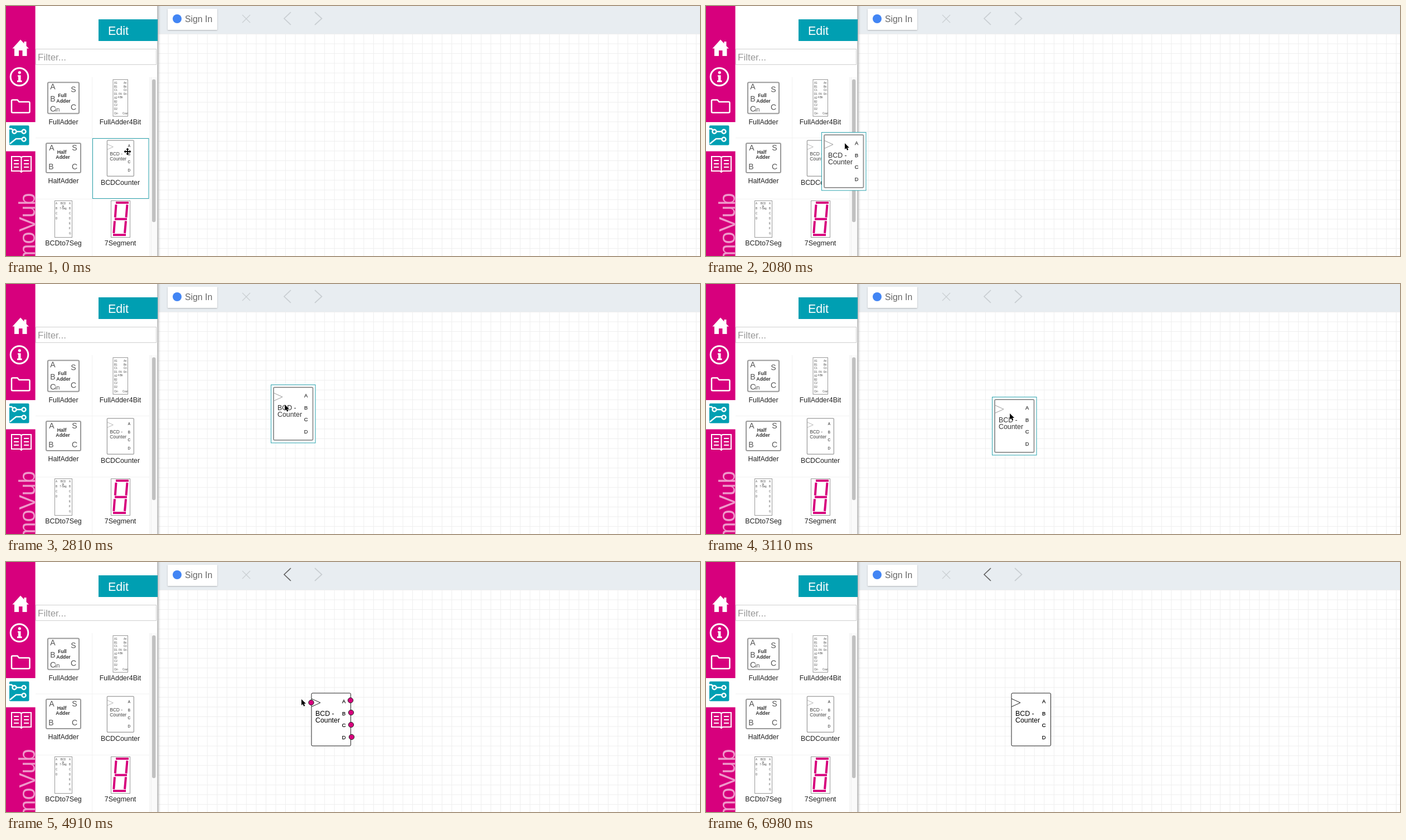
An HTML page for the animation above (7.47 s loop, 1245 px wide and 450 px high).

```html
<!DOCTYPE html>
<html lang="en">
<head>
<meta charset="utf-8">
<title>Circuit editor</title>
<style>
  html, body { margin: 0; width: 100%; height: 100%; overflow: hidden; background: #fff; }
  svg { display: block; width: 1245px; height: 450px; font-family: "Liberation Sans", Arial, sans-serif; }
  .icon { fill: none; stroke: #fff; stroke-width: 2.5; }
  .fine { stroke-width: 2; }
  .chip { fill: #fff; stroke: #999; stroke-width: 2; }
  .thin { stroke-width: 1; }
  .mid { text-anchor: middle; }
  .label { font-size: 12.4px; fill: #222; text-anchor: middle; }
  .pin { font-size: 14px; fill: #555; text-anchor: middle; }
  .name { font-size: 8.8px; font-weight: bold; fill: #333; text-anchor: middle; }
  .tiny { font-size: 4.6px; fill: #444; }
  .nav { fill: none; stroke: #c9ced2; stroke-width: 1.7; }
  .seg { stroke: #d7007d; stroke-width: 4; }
</style>
</head>
<body>
<svg viewBox="0 0 1245 450">
  <defs>
    <pattern id="grid" x="273" y="50" width="17.54" height="17.54" patternUnits="userSpaceOnUse">
      <path d="M.5 0V17.54M0 .5H17.54" stroke="#eee" fill="none"/>
    </pattern>
    <linearGradient id="edge">
      <stop stop-color="#777" stop-opacity=".75"/>
      <stop offset=".35" stop-color="#999" stop-opacity=".3"/>
      <stop offset="1" stop-color="#999" stop-opacity="0"/>
    </linearGradient>
    <filter id="shadow" x="-10%" y="-20%" width="120%" height="150%">
      <feDropShadow dx="0" dy="1" stdDeviation="1" flood-opacity=".25"/>
    </filter>
    <g id="counter">
      <rect x="5" y="5" width="70.5" height="95" rx="2" fill="#fff" stroke="currentColor"/>
      <path d="M5 15L21 22.3 5 29.6" fill="none" stroke="currentColor" stroke-width="1"/>
      <g stroke="none" fill="var(--ink)">
        <text font-size="12.4" x="12" y="45.5">BCD -</text>
        <text font-size="12.4" x="12" y="58">Counter</text>
        <g class="mid" font-size="9.3" stroke="var(--ink)" stroke-width=".25">
          <text x="63" y="22.5">A</text><text x="63" y="45">B</text>
          <text x="63" y="66">C</text><text x="63" y="88">D</text>
        </g>
      </g>
    </g>
  </defs>

  <!-- canvas and toolbar -->
  <rect x="272" y="50" width="973" height="400" fill="url(#grid)"/>
  <rect x="272" width="973" height="50" fill="#e8edf1"/>
  <rect x="290" y="5" width="89" height="38" rx="1" fill="#fff" filter="url(#shadow)"/>
  <circle cx="307" cy="23" r="8" fill="#4285f4"/>
  <text x="321" y="29" font-size="15.8" fill="#666">Sign In</text>
  <path class="nav" style="stroke-width:1.2" d="M424 16L438 30M438 16L424 30"/>
  <path class="nav" id="undo" d="M511 11L499 22.5 511 34"/>
  <path class="nav" d="M554 11L566.5 22.5 554 34"/>

  <!-- component panel -->
  <rect x="52" width="220" height="450" fill="#fff"/>
  <rect x="271.5" width="6" height="450" fill="url(#edge)"/>
  <rect x="166" y="24" width="106" height="39" fill="#009fb2"/>
  <text x="183" y="52" font-size="21.5" fill="#fff">Edit</text>
  <rect x="53.5" y="77.5" width="216" height="28" fill="#fff" stroke="#d0d0d0"/>
  <text x="57" y="97.5" font-size="17" fill="#999">Filter...</text>
  <rect id="caret" x="57" y="81" width="1" height="21" fill="#222"/>
  <path d="M154.5 128V450M257.5 128V450M53 237.5H257M53 347.5H257" stroke="#f1f1f1"/>
  <rect x="260" y="128" width="11" height="322" fill="#fafafa"/>
  <path d="M260 128V450" stroke="#eaeaea"/>
  <rect x="262" y="132" width="6.5" height="257" rx="3.2" fill="#c1c1c1"/>
  <rect id="hover" x="155.5" y="238.5" width="100.5" height="108" fill="#fff" stroke="#2ba3ae"/>

  <rect class="chip" x="75" y="137.5" width="56" height="56" rx="2"/>
  <g class="pin">
    <text x="84" y="150">A</text><text x="121" y="155">S</text><text x="84" y="172">B</text>
    <text x="84" y="190">C</text><text x="92" y="190" font-size="11">in</text><text x="121" y="187">C</text>
  </g>
  <text class="name" x="101" y="164">Full</text><text class="name" x="103" y="174">Adder</text>

  <rect class="chip" x="72" y="247" width="62" height="53" rx="2"/>
  <g class="pin">
    <text x="82" y="260">A</text><text x="123" y="260">S</text>
    <text x="81" y="294">B</text><text x="123" y="294">C</text>
  </g>
  <text class="name" x="100" y="266">Half</text><text class="name" x="102" y="275">Adder</text>

  <rect class="chip thin" x="192" y="132.5" width="26.5" height="66"/>
  <rect class="chip thin" x="87.5" y="350.5" width="31" height="66"/>
  <g class="tiny" id="tiny"></g>
  <use href="#counter" transform="translate(178 238.4) scale(.68)" stroke-width="1.8" style="color:#999;--ink:#444"/>

  <rect class="chip thin" x="188.5" y="350.5" width="34" height="66"/>
  <path class="seg" d="M197 354H220M195 383.5H217M192 412H215M197.5 357.5L195.8 380.5M217.5 357.5L215.5 380.5M195 387L193.3 409M215 387L213 409"/>
  <g class="label">
    <text x="103" y="213">FullAdder</text><text x="205" y="213">FullAdder4Bit</text>
    <text x="103" y="319">HalfAdder</text><text x="205" y="322">BCDCounter</text>
    <text x="103" y="431">BCDto7Seg</text><text x="205" y="431">7Segment</text>
  </g>

  <!-- sidebar -->
  <rect width="52.6" height="450" fill="#d7007d"/>
  <rect y="209" width="53" height="52.5" fill="#fff"/>
  <path d="M11.5 76.5L26 60.500 32.500 67.500V64H36.500V72L41 76.500H37.500V90H29.500V80H23V90H15V76.500Z" fill="#fff"/>
  <circle class="icon" style="stroke-width:3" cx="24" cy="127.500" r="15.800"/>
  <path d="M21 124.500H26.500V134H28.500V137H20V134H22V127H21Z" fill="#fff"/>
  <circle cx="24.300" cy="119.800" r="2.600" fill="#fff"/>
  <path class="icon" d="M10 190V171Q10 169 12 169H20.500L23.500 172.500H40.500Q42.500 172.500 42.500 174.500V190Q42.500 192 40.500 192H12Q10 192 10 190Z"/>
  <rect x="6" y="215" width="35.500" height="35.500" rx="2" fill="#009fb2"/>
  <g class="icon">
    <circle cx="15" cy="226" r="3.500"/><circle cx="32" cy="226" r="3.500"/><circle cx="32" cy="240" r="3.500"/>
    <path d="M6 221H10L12 223M18.500 226H28.500M7 248L18 239H28.500"/>
  </g>
  <path class="icon fine" d="M27.500 274Q27.500 271 24 271H10V297H24Q27.500 297 27.500 300Q27.500 297 31 297H45V271H31Q27.500 271 27.500 274V300"/>
  <path class="icon fine" d="M14 278H23M14 284H23M14 290H23M32 278H41M32 284H41M32 290H41"/>
  <text transform="translate(52 336.500) rotate(-90)" text-anchor="end" font-size="40" fill="#fff" fill-opacity=".6">LumoVub</text>

  <!-- moving parts -->
  <g id="ghost">
    <rect x=".5" y=".5" width="79.5" height="104.5" fill="#fff" stroke="#2ba3ae"/>
    <use href="#counter" stroke-width="2" style="color:#999;--ink:#333"/>
  </g>
  <g id="placed">
    <use href="#counter" x="543" y="231" style="color:#222;--ink:#000"/>
    <g id="pins" fill="#d7007d" stroke="#222">
      <circle cx="547.5" cy="253" r="4.7"/><circle cx="618" cy="249" r="4.7"/>
      <circle cx="619" cy="271" r="4.7"/><circle cx="619" cy="293" r="4.7"/><circle cx="620" cy="315" r="4.7"/>
    </g>
  </g>
  <path id="move" d="M0-6.5L2.8-3.5H.9V-.9H3.5V-2.8L6.5 0 3.5 2.8V.9H.9V3.5H2.8L0 6.5-2.8 3.5H-.9V.9H-3.5V2.8L-6.5 0-3.5-2.8V-.9H-.9V-3.5H-2.8Z" stroke="#fff" paint-order="stroke"/>
  <path id="arrow" d="M0 0V11L2.5 8.7 4.2 12.7 6.3 11.8 4.6 8H8Z" stroke="#fff" paint-order="stroke"/>
</svg>
<script>
const LOOP = 7470, STEP = 148.5;
const $ = id => document.getElementById(id);

// Keys: step, x, y
const cursorPath = [
  [0, 218, 262], [5, 218, 265], [11, 219, 264], [12, 222, 262], [14, 249, 247], [15, 285, 233],
  [17, 393, 214], [18, 462, 212], [20, 538, 222], [21, 545, 233], [23, 547, 237], [32, 547, 237],
  [33, 530, 247], [35, 440, 300], [37, 330, 330], [38, 305, 306], [40, 305, 304],
  [41, 335, 309], [43, 600, 350], [45, 1030, 415], [46, 1189, 438]
];
const ghostPath = [
  [11, 176, 244], [14, 207, 227], [17, 316, 203], [18, 421, 190],
  [19, 475, 181], [20, 505, 190], [21, 513, 203], [23, 523, 214]
];

function along(path, k) {
  const i = path.findIndex(p => p[0] >= k);
  if (i < 0) return path.at(-1).slice(1);
  if (i === 0) return path[0].slice(1);
  const a = path[i - 1], b = path[i], u = (k - a[0]) / (b[0] - a[0]);
  return [1, 2].map(j => a[j] + (b[j] - a[j]) * u);
}

function column(words, x, y, gap, mid) {
  return words.split(" ").map((word, i) =>
    `<text x="${x}" y="${y + i * gap}"${mid ? ' class="mid"' : ""}>${word}</text>`).join("");
}

$("tiny").innerHTML =
  column("A1 B1 C1 D1 A2 B2 C2 D2", 194, 140, 6.7) + column("An Bn Cn Dn", 211, 140, 6.5) +
  column("FA 4&nbsp;Bit", 205, 160, 6, true) + column("Cin", 194, 195, 0) + column("Cout", 209, 195, 0) +
  column("A B C D", 89, 357, 9) + column("A B C D E F G", 113, 357, 9) +
  column("BCD to 7-Seg", 102.5, 357, 4.7, true);

const show = (id, on) => $(id).style.display = on ? "" : "none";
const place = (id, [x, y]) => $(id).setAttribute("transform", `translate(${x} ${y})`);

function draw(now) {
  const k = Math.floor((now % LOOP + 15) / STEP);
  const dragging = k >= 11 && k < 26, dropped = k >= 26;
  show("caret", k >= 2 && k < 5 || k >= 9 && k < 13);
  show("hover", k < 11);
  show("move", k < 11);
  show("arrow", k >= 11 && k < 47);
  show("ghost", dragging);
  show("placed", dropped);
  show("pins", k < 34);
  $("undo").style.stroke = dropped ? "#666" : "";
  const cursor = along(cursorPath, k);
  place("move", cursor);
  place("arrow", cursor);
  place("ghost", along(ghostPath, k));
}

const start = performance.now();
function tick() {
  draw(performance.now() - start);
  requestAnimationFrame(tick);
}
tick();
</script>
</body>
</html>
```
